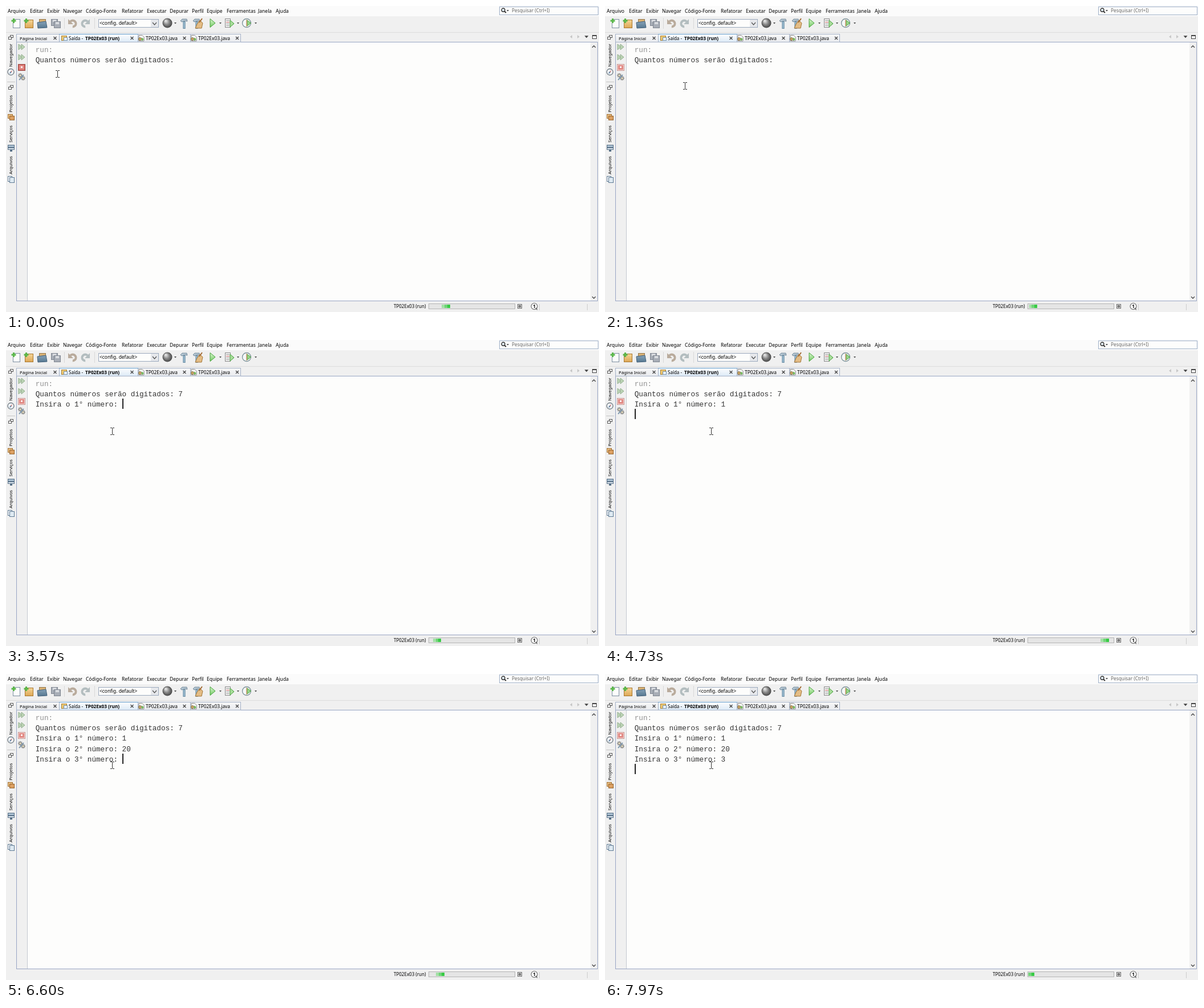
An HTML page with a canvas that plays this animation: 1040x538 px, repeating every 8 s.

```html
<!DOCTYPE html>
<html lang="pt">
<head>
<meta charset="utf-8">
<title>Console</title>
<style>
html, body { margin: 0; width: 100%; height: 100%; overflow: hidden; background: #f0f0f0; }
canvas { display: block; }
</style>
</head>
<body>
<canvas id="stage" width="1040" height="538"></canvas>
<script>
const LOOP = 8000;
const UI = '"Noto Sans", "Open Sans", sans-serif';
const MONO = '"Liberation Mono", monospace';
const PAGE = '#fdfdfc', CHROME = '#f0f0f0';
const stage = document.getElementById('stage').getContext('2d');
const backdrop = document.createElement('canvas');
backdrop.width = 1040;
backdrop.height = 538;
let g = backdrop.getContext('2d');

function box(x, y, w, h, fill, line) {
  if (fill) { g.fillStyle = fill; g.fillRect(x, y, w, h); }
  if (line) { g.strokeStyle = line; g.lineWidth = 1; g.strokeRect(x + .5, y + .5, w - 1, h - 1); }
}
function poly(points, fill, line, width = 1) {
  g.beginPath();
  for (let i = 0; i < points.length; i += 2) g.lineTo(points[i], points[i + 1]);
  if (fill) { g.closePath(); g.fillStyle = fill; g.fill(); }
  if (line) { g.strokeStyle = line; g.lineWidth = width; g.stroke(); }
}
function disc(x, y, r, fill, line, width = 1) {
  g.beginPath();
  g.arc(x, y, r, 0, Math.PI * 2);
  if (fill) { g.fillStyle = fill; g.fill(); }
  if (line) { g.strokeStyle = line; g.lineWidth = width; g.stroke(); }
}
function label(text, x, y, size, color = '#000', weight = '') {
  g.font = `${weight} ${size}px ${UI}`;
  g.fillStyle = color;
  g.fillText(text, x, y);
}
function shade(y0, y1, top, bottom) {
  const fill = g.createLinearGradient(0, y0, 0, y1);
  fill.addColorStop(0, top);
  fill.addColorStop(1, bottom);
  return fill;
}
const down = (x, y, r = 2, color = '#444') => poly([x - r, y - r / 2, x + r, y - r / 2, x, y + r / 2 + .5], color);
const plus = (x, y) => { box(x - 1.5, y - 4, 3, 8, '#5cb84c'); box(x - 4, y - 1.5, 8, 3, '#5cb84c'); };
const play = (x, y, w, h, fill, line) => poly([x, y - h, x + w, y, x, y + h, x, y - h], fill, line);
const cross = (x, y) => {
  poly([x - 2.5, y - 2.5, x + 2.5, y + 2.5], null, '#444', 1.2);
  poly([x - 2.5, y + 2.5, x + 2.5, y - 2.5], null, '#444', 1.2);
};

function drawMenu() {
  box(0, 0, 1040, 18, '#fbfbfb');
  const items = { Arquivo: 3, Editar: 42, Exibir: 72, Navegar: 100, 'Código-Fonte': 140, Refatorar: 203,
    Executar: 247, Depurar: 287, Perfil: 326, Equipe: 352, Ferramentas: 387, Janela: 442, Ajuda: 473 };
  for (const name in items) label(name, items[name], 12, 8.5);
  box(865, 1, 174, 15, PAGE, '#9fb0c8');
  disc(872, 7, 3, '#dfeaf2', '#333', 1.3);
  poly([874, 9, 877, 12], null, '#333', 1.8);
  down(880, 8);
  label('Pesquisar (Ctrl+I)', 887, 11, 8.3, '#666');
}

function hammer(x, y) {
  poly([x - 6, y - 5, x - 3, y - 8, x + 5, y - 8, x + 6, y - 4, x + 2, y - 5, x - 4, y - 3], '#b3c5d2', '#607788', .8);
  box(x - 1.5, y - 4, 4, 13, '#9fc0d4', '#6688a0');
}
function curl(x, dir, color) {
  g.beginPath();
  g.arc(x, 31, 5.5, dir > 0 ? -2.4 : Math.PI + 2.4, dir > 0 ? 1.6 : Math.PI - 1.6, dir < 0);
  g.strokeStyle = color;
  g.lineWidth = 4;
  g.stroke();
  poly([x - 8 * dir, 23, x - 8 * dir, 32, x + dir, 32], color);
}
function drawToolbar() {
  box(0, 18, 1040, 29, CHROME);
  box(0, 46, 1040, 1, '#dcdcdc');
  box(12, 23, 13, 16, PAGE, '#7d8ea0');
  plus(13.5, 26);
  box(33, 24, 15, 15, shade(24, 39, '#f6d699', '#dca653'), '#a9772c');
  plus(35.5, 26);
  box(58, 23, 12, 8, '#d9b174', '#94764a');
  poly([55, 29, 70, 27, 72, 38, 56, 39], shade(27, 39, '#86a2b8', '#557790'), '#42607a');
  for (const [x, y] of [[79, 23], [84, 27]]) {
    box(x, y, 12, 12, '#a8aeb7', '#7e8590');
    box(x + 3, y + 1, 6, 4, '#d9dce0');
  }
  box(102, 21, 1, 19, '#d8d8d8');
  curl(117, 1, '#b9ab9c');
  curl(139, -1, '#b3bdbf');
  box(155, 21, 1, 19, '#d8d8d8');

  box(162, 23, 106, 15, PAGE, '#9ba9bd');
  label('<config. default>', 164, 33, 8.4);
  box(254, 24, 13, 13, '#e6e8ec');
  poly([257, 29, 260.5, 33, 264, 29], null, '#555', 1.2);

  const globe = g.createRadialGradient(280, 26, 1, 283, 30, 9);
  globe.addColorStop(0, '#e2e2e2');
  globe.addColorStop(.5, '#858585');
  globe.addColorStop(1, '#3f3f3f');
  disc(283, 30, 8.5, globe);
  hammer(312, 31);
  hammer(334, 31);
  poly([340, 25, 345, 30, 343, 39, 332, 39, 335, 32], '#e4bd86', '#a47738');
  poly([339, 29, 344, 22], null, '#a46d37', 2);
  play(358, 30, 9, 7.5, shade(23, 37, '#d6f5cb', '#77cc68'), '#46a23b');
  box(384, 22, 10, 16, '#f4f4f4', '#888');
  for (let y = 25; y < 37; y += 3) box(386, y, 6, 1, y === 28 ? '#cc6666' : '#999');
  play(393, 31, 7, 6, '#a9dd9b', '#46a23b');
  disc(422, 30, 7.5, '#f4f8f8', '#7d9299', 1.3);
  play(423, 30, 6.5, 5, '#9ad68b', '#46a23b');
  poly([422, 24, 422, 36], null, '#c4824f', 1.2);
  for (const x of [297, 376, 407, 438]) down(x, 30);
}

function javaIcon(x) {
  poly([x - 4, 51.5, x + 2, 51.5, x + 5, 54.5, x + 5, 61.5, x - 4, 61.5, x - 4, 51.5], '#f5f5f5', '#8a8a8a');
  disc(x - 2, 58, 2.5, '#c8a560', '#7d6a48', .8);
  play(x + 1, 58.5, 4, 3, '#67b650');
}
function drawTabs() {
  box(18, 49, 394, 15, shade(49, 64, '#f8f8f8', '#e8eaee'), '#a5b2c7');
  for (const x of [93, 231, 323]) box(x, 49, 1, 15, '#a5b2c7');
  box(94, 49, 137, 14, shade(49, 63, '#ffffff', '#dceaf6'));
  box(93, 49, 139, 1, '#5f9bcb');
  label('Página Inicial', 24, 60, 7.7);
  box(97, 52, 10, 9, '#f0cb72', '#a27c38');
  box(101, 55, 7, 6, '#eff4f8', '#708da6');
  label('Saída - ', 110, 60, 8);
  label('TP02Ex03 (run)', 139, 60, 8.2, '#000', 'bold');
  javaIcon(237);
  label('TP02Ex03.java', 245, 60, 8.4);
  javaIcon(329);
  label('TP02Ex03.java', 337, 60, 8.4);
  for (const x of [86, 221, 313, 405.5]) cross(x, 56.5);
  poly([993, 51, 993, 57, 989, 54], '#c7c7c7');
  poly([1002, 51, 1002, 57, 1006, 54], '#c7c7c7');
  down(1018, 54, 3.5);
  box(1028, 51, 8, 7, '#fafafa', '#444');
  box(1028, 51, 8, 2, '#444');
}

function restoreIcon(y) {
  box(7, y - 4, 6, 5, '#f8f8f8', '#555');
  box(4, y - 1, 6, 5, '#f8f8f8', '#555');
}
function drawSidebar() {
  restoreIcon(55);
  restoreIcon(143);
  for (const [name, y] of [['Navegador', 107], ['Projetos', 187], ['Serviços', 240], ['Arquivos', 296]]) {
    g.save();
    g.translate(11, y);
    g.rotate(-Math.PI / 2);
    label(name, 0, 0, 7.8);
    g.restore();
  }
  disc(8.5, 116, 5.5, '#f2f5f8', '#6d7880', 1.3);
  poly([11, 112.5, 9.5, 117, 8, 116], '#c0605a');
  poly([9.5, 117, 6, 119.5, 7.5, 115], '#5e82a5');
  box(2, 133, 14, 1, '#c5c5c5');
  box(3, 190, 9, 8, '#e9be80', '#a17137');
  box(6, 193, 9, 8, '#dca062', '#95632d');
  box(3, 244, 12, 5, '#a9bed0', '#5b7389');
  box(3, 249, 12, 4, '#dbe5ee', '#5b7389');
  box(7, 253, 4, 3, '#5b7389');
  box(3, 299, 8, 10, '#f4f7fa', '#607b94');
  box(6, 301, 9, 10, '#dfeaf2', '#607b94');
}

function drawPanel() {
  box(18, 63, 1020, 456, PAGE, '#98a5c4');
  box(19, 64, 19, 454, CHROME);
  box(37, 64, 1, 454, '#c5c9cf');
  box(1025, 64, 12, 454, CHROME);
  poly([1028, 73, 1031, 70, 1034, 73], null, '#444', 1.3);
  poly([1028, 511, 1031, 514, 1034, 511], null, '#444', 1.3);
  for (const y of [72, 90]) {
    play(22, y, 6, 5, '#bcd4b5', '#93ae8e');
    play(27, y, 6, 5, '#bcd4b5', '#93ae8e');
  }
  for (const [x, y] of [[25, 122], [30, 127]]) {
    for (let a = 0; a < 4; a++) {
      const dx = Math.cos(a * Math.PI / 4) * 4, dy = Math.sin(a * Math.PI / 4) * 4;
      poly([x - dx, y - dy, x + dx, y + dy], null, '#777', 1.2);
    }
    disc(x, y, 2.2, '#ece3c4', '#777');
  }
  poly([23, 130, 31, 121], null, '#829bae', 2);
}

function drawStatus() {
  label('TP02Ex03 (run)', 680, 531, 8);
  box(741, 523, 152, 10, '#e5e5e5', '#b5b5b5');
  box(897, 524, 8, 8, '#eee', '#666');
  box(899, 526, 4, 4, '#999', '#555');
  disc(926.5, 528, 5.5, '#fafafa', '#666', 1.1);
  poly([928, 532, 932, 535, 931, 530], '#666');
  label('1', 924.2, 531, 8, '#000', 'bold');
  box(935, 524, 1, 11, '#ccc');
  box(1019, 524, 1, 11, '#ccc');
}

function drawBackdrop() {
  box(0, 0, 1040, 538, CHROME);
  drawMenu();
  drawToolbar();
  drawPanel();
  drawTabs();
  drawSidebar();
  drawStatus();
}

// Console output: [time, text appended]
const ASK = n => `Insira o ${n}° número: `;
const EVENTS = [
  [2530, ''], [2700, '7'], [2970, '\n'], [3200, ASK(1)],
  [4150, '1'], [4560, '\n'], [4900, ASK(2)],
  [5600, '2'], [5820, '0'], [6200, '\n'], [6460, ASK(3)],
  [7380, '3'], [7760, '\n']
];
const COLUMN = 7.6, ROW = 18.3;

function drawConsole(t) {
  let text = 'run:\nQuantos números serão digitados: ';
  let last = -1;
  for (const [time, added] of EVENTS) {
    if (time > t) break;
    text += added;
    last = time;
  }
  const lines = text.split('\n');
  g.font = `12.67px ${MONO}`;
  lines.forEach((line, i) => {
    g.fillStyle = i ? '#333' : '#909090';
    g.fillText(line, 51.7, 80.6 + i * ROW);
  });
  if (last >= 0 && Math.floor((t - last) / 500) % 2 === 0) {
    const row = lines.length - 1;
    box(Math.round(51.7 + lines[row].length * COLUMN), Math.round(66.5 + row * ROW), 2, 18, '#222');
  }
}

function drawStop(t) {
  const strong = t < 860;
  box(21, 102, 13, 12, strong ? '#cf5a55' : '#f6d8d5', strong ? '#9c5652' : '#c99692');
  box(23, 104, 9, 8, strong ? '#e28a84' : '#e18a84');
  box(26, 106, 3, 3, '#fbeeee');
}

function drawPointer(t) {
  const k = Math.min(1, Math.max(0, (t - 1000) / 700));
  const e = k * k * (3 - 2 * k);
  const x = Math.round(90 + 96 * e), y = Math.round(119 + 41 * e);
  box(x, y - 5, 1, 11, '#333');
  for (const edge of [-6, 6]) {
    box(x - 3, y + edge, 3, 1, '#333');
    box(x + 1, y + edge, 3, 1, '#333');
  }
}

// A 30-step sweep, one step each 50 ms; the sweep pauses briefly before 3200 ms.
function sweepStep(t) {
  if (t >= 3200) return Math.floor((t - 3340) / 50) + 30;
  const s = Math.min(t, 2970);
  return Math.max(Math.min(12, Math.floor((s + 370) / 50)), Math.floor((s + 300) / 50));
}
function drawProgress(t) {
  const left = 727.8 + (sweepStep(t) % 30) * 157 / 30;
  g.save();
  g.beginPath();
  g.rect(742, 524, 150, 8);
  g.clip();
  ['#a3dfa6', '#70d477', '#38ca45'].forEach((color, i) => box(Math.round(left + i * 4.8), 525, 5, 6, color));
  g.restore();
}

function frame(now) {
  const t = (now - start) % LOOP;
  g.drawImage(backdrop, 0, 0);
  drawStop(t);
  drawConsole(t);
  drawPointer(t);
  drawProgress(t);
  requestAnimationFrame(() => frame(performance.now()));
}

drawBackdrop();
g = stage;
const start = performance.now();
frame(start);
</script>
</body>
</html>
```
